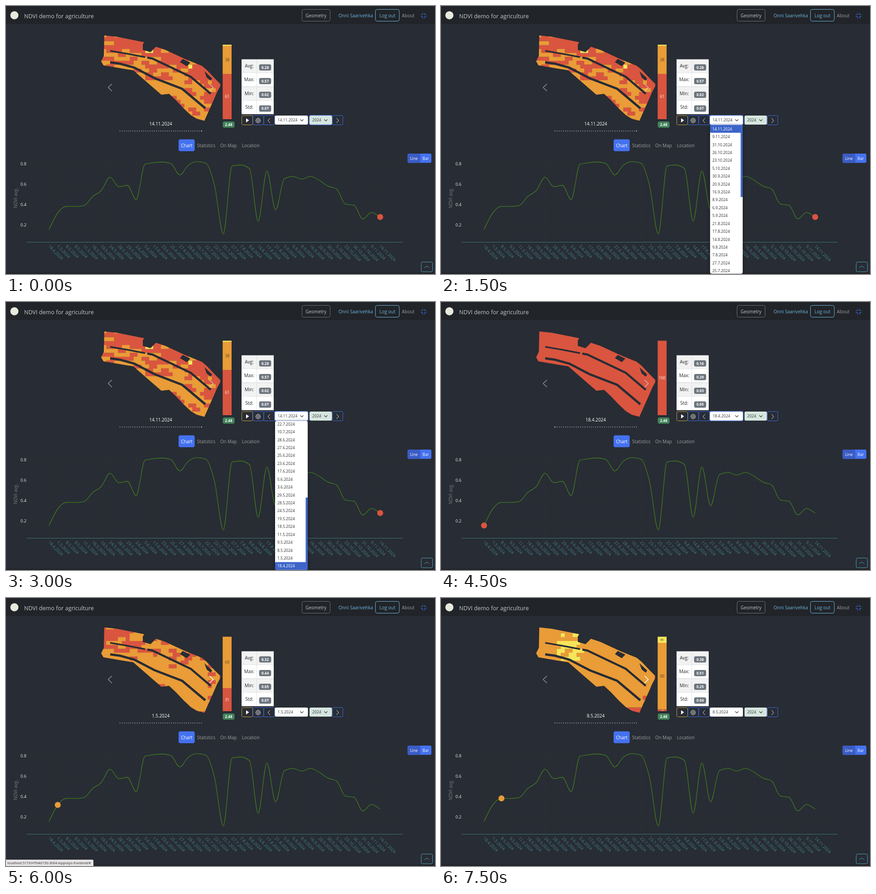
Write an HTML page that moves like this. It is 947 px wide and 592 px high and loops after 8 s.

```html
<!DOCTYPE html>
<html lang="en">
<head>
<meta charset="utf-8">
<title>NDVI demo for agriculture</title>
<style>
html, body { margin: 0; width: 100%; height: 100%; overflow: hidden; background: #282c34; }
svg { display: block; width: 100vw; height: 100vh; font-family: "Open Sans", "Noto Sans", sans-serif; }
</style>
</head>
<body>
<svg id="stage" viewBox="0 0 947 592">
  <defs>
    <clipPath id="field"><path d="M217 65L245 68L305 80L302 85V97L319 102L331 90L352 97L395 117L432 132L443 141L461 160L473 172V177L466 190L460 204L448 231L438 253.500L421 249L408 241L392 226L375 208L360 194L343 196L305 163L281 142L262 139L215 131L210 122L216 110Z"/></clipPath>
    <filter id="shade" x="-30%" y="-10%" width="160%" height="120%"><feGaussianBlur stdDeviation="4"/></filter>
  </defs>
  <g id="base"></g>
  <g id="live"></g>
</svg>
<script>
const BG = '#282c34', RED = '#d9553f', ORANGE = '#e99c37', YELLOW = '#f6e55a';
const BLUE = '#4472f0', DEEP = '#3d65c9', EDGE = '#3f68dc', GREY = '#9a9da2', DARK = '#212529', SKY = '#70b6e4';

const days = ('18.4 1.5 8.5 9.5 11.5 18.5 19.5 24.5 28.5 29.5 3.6 5.6 17.6 23.6 25.6 27.6 28.6 10.7 22.7 23.7 ' +
  '25.7 27.7 7.8 9.8 14.8 17.8 21.8 5.9 6.9 8.9 16.9 20.9 30.9 5.10 23.10 26.10 31.10 9.11 14.11')
  .split(' ').map(d => d + '.2024');
const ndvi = [.157, .32, .384, .383, .391, .48, .54, .671, .577, .59, .45, .797, .813, .82, .803, .693, .79, .824, .808,
  .585, .113, .78, .79, .755, .24, .732, .35, .655, .677, .652, .678, .64, .583, .555, .407, .395, .26, .324, .28];
const last = days.length - 1;
const px = i => 95 + 731 / last * i;
const py = v => 529 - 225 * v;

function text(x, y, str, size, fill, anchor = 'start', extra = '') {
  return `<text x="${x}" y="${y}" font-size="${size}" fill="${fill}" text-anchor="${anchor}" ${extra}>${str}</text>`;
}
const mid = (x, y, str, size, fill, extra) => text(x, y, str, size, fill, 'middle', extra);
const bold = (x, y, str) => mid(x, y, str, 8, '#fff', 'font-weight="700"');
function rect(x, y, w, h, fill, r = 0, stroke = 'none', extra = '') {
  return `<rect x="${x}" y="${y}" width="${w}" height="${h}" rx="${r}" fill="${fill}" stroke="${stroke}" ${extra}/>`;
}
function line(d, stroke, width = 1, extra = '') {
  return `<path d="${d}" fill="none" stroke="${stroke}" stroke-width="${width}" ${extra}/>`;
}
const chevron = (x, y, w, h) => `M${x - w / 2} ${y - h / 2}l${w} ${h / 2}l${-w} ${h / 2}`;

// Monotone cubic through equally spaced points
function curve() {
  const p = ndvi.map(py);
  const rise = p.slice(1).map((y, i) => y - p[i]);
  const slope = p.map((_, i) => {
    const a = rise[i - 1] ?? rise[0], b = rise[i] ?? rise[i - 1];
    return (Math.sign(a) + Math.sign(b)) * Math.min(Math.abs(a), Math.abs(b), Math.abs(a + b) / 4);
  });
  slope[0] = (3 * rise[0] - slope[1]) / 2;
  let d = `M${px(0)} ${p[0]}`;
  for (let i = 0; i < last; i++) {
    d += `C${px(i + 1 / 3)} ${p[i] + slope[i] / 3} ${px(i + 2 / 3)} ${p[i + 1] - slope[i + 1] / 3} ${px(i + 1)} ${p[i + 1]}`;
  }
  return d;
}

function header() {
  let corners = '';
  for (let turn = 0; turn < 360; turn += 90) {
    corners += line('M2.100 6.400V3.400A1.300 1.300 0 0 1 3.400 2.100H6.400', '#416fee', 1.1,
      `transform="translate(922 21.300) rotate(${turn})"`);
  }
  return rect(0, 0, 947, 40, '#212428') + rect(0, 589, 947, 3, '#212428') +
    '<circle cx="18.500" cy="20.500" r="9" fill="#e9e8dc"/>' +
    text(40, 26.7, 'NDVI demo for agriculture', 12.6, '#c6c8ca') +
    rect(653.5, 7.5, 62, 26, 'none', 4, '#6c757d') + mid(684.3, 24.5, 'Geometry', 9.9, '#c6c8ca') +
    text(734, 24.5, 'Onni Saarivehka', 10, SKY) +
    rect(815.5, 7.5, 52.7, 26, 'none', 4, SKY) + mid(842, 24.5, 'Log out', 10, SKY) +
    text(873.7, 24.5, 'About', 10, GREY) + corners;
}

function controls() {
  let out = '';
  ['Avg:', 'Max:', 'Min:', 'Std:'].forEach((name, i) => {
    const y = 117.7 + 30.3 * i;
    out += rect(520, y, 71, 30.3, i % 2 ? '#fff' : '#f2f2f2') + line(`M520 ${y + 30}H591`, '#dee2e6') +
      mid(537, y + 18.3, name, 10, DARK) + rect(558.7, y + 11, 26.6, 13.8, '#6c757d', 3.5);
  });
  out += line('M553.5 118V239', '#dee2e6');
  out += rect(478.5, 255, 26, 13.7, '#41845a', 3.5) + bold(491.5, 264.9, '2.48');
  out += rect(520.5, 242, 24, 20.5, 'none', 3, '#c5a43f') + '<path d="M530 248L536.500 252.600L530 257.300Z" fill="#fff"/>';
  out += [[545, 23.5], [569, 24], [720.5, 23]].map(([x, w]) => rect(x, 242, w, 20.5, 'none', 2, EDGE)).join('');
  let gear = '';
  for (let i = 0; i <= 48; i++) {
    const a = i / 48 * 2 * Math.PI, r = 4.7 + .7 * Math.tanh(3 * Math.cos(8 * a));
    gear += `${i ? 'L' : 'M'}${(556.5 + r * Math.cos(a)).toFixed(2)} ${(253 + r * Math.sin(a)).toFixed(2)}`;
  }
  out += line(gear, '#fff', .9) + '<circle cx="556.500" cy="253" r="2" fill="none" stroke="#fff" stroke-width=".9"/>';
  return out + line(chevron(580.5, 253, -5, 10.5) + chevron(732, 253, 5, 10.5), '#e4e6e9');
}

function chart() {
  let out = rect(381, 294.5, 35.5, 26.3, BLUE, 4) + mid(398.8, 311.7, 'Chart', 9.9, '#fff') +
    text(421.7, 311.7, 'Statistics', 9.9, GREY) + text(472.7, 311.7, 'On Map', 9.9, GREY) +
    text(520.8, 311.7, 'Location', 9.9, GREY);
  out += rect(886.5, 326, 52.5, 20.5, BLUE, 3) + rect(886.5, 326, 28, 20.5, '#3a5cc4', 3) +
    mid(900.5, 339.6, 'Line', 8.7, '#fff') + mid(926.6, 339.6, 'Bar', 8.7, '#fff');
  for (const v of [.2, .4, .6, .8]) {
    out += line(`M46 ${py(v)}H876`, '#2d3137', .8) + text(45, py(v) + 3.3, v.toFixed(1), 9.2, '#e8e9ea', 'end');
  }
  days.forEach((day, i) => {
    out += line(`M${px(i)} 328V522`, '#2d3137', .8) +
      text(0, 0, day, 9.2, '#41868a', 'start', `transform="translate(${px(i) - 2.3} 531.600) rotate(45)"`);
  });
  out += mid(0, 0, 'NDVI avg.', 10, '#767a80', 'transform="translate(25 424) rotate(-90)"');
  out += line('M45.500 521.800H876', '#3c7876') + line(curve(), '#3f7d20', 1.3);
  return out + rect(916.5, 565.5, 25, 21.5, 'none', 3, '#529eb5') + line('M923.500 578L929 574.500L934.500 578', '#529eb5');
}

// Vegetation class of a cell: 0 red, 1 orange, 2 yellow.
// "deep" counts cells down from the field's upper edge, "n" is seeded noise in 0..1.
const RULES = {
  autumn(c, r, deep, n) {
    if (Math.hypot(c - 12.5, r - 4.2) < .9 || Math.hypot(c - 23, r - 8) < .5) return 2;
    const chance = c < 2 && r > 3 ? .9 : deep < 3 ? .1 : deep < 9 ? .52 : .65;
    return n < chance ? 1 : 0;
  },
  spring: () => 0,
  may1(c, r, deep, n) {
    const chance = c > 27 ? .6 : deep > 4.5 ? .04 : c < 8 && deep < 2 ? .9 : .42;
    return n < chance ? 0 : 1;
  },
  may8(c, r, deep, n) {
    if (r > 20 || c > 30 || (c > 27 && r > 15 && n < .5)) return 0;
    return Math.hypot(c - 9, (r - 5) * .9) < 3.6 && n < .6 ? 2 : 1;
  }
};
const CELL = 8.63;
function noise(c, r) {
  const s = Math.sin(((c + r % 2) >> 1) * 12.9898 + r * 78.233) * 43758.5453;
  return s - Math.floor(s);
}
function mosaic(rule) {
  const paths = ['', '', ''];
  for (let r = 0; r < 23; r++) {
    for (let c = 0; c < 32; c++) {
      paths[rule(c, r, r - .5 - .0107 * c * c, noise(c, r))] += `M${c} ${r}h1.020v1.020h-1.020z`;
    }
  }
  return `<g transform="translate(203.900 60.400) scale(${CELL})">` +
    [RED, ORANGE, YELLOW].map((fill, i) => `<path d="${paths[i]}" fill="${fill}"/>`).join('') + '</g>';
}
function field(map) {
  return `<g clip-path="url(#field)">${mosaic(RULES[map])}` +
    line('M230 99L268 105.500L307 113', BG, 3.4) +
    line('M312 114L323 116L408 156.500L452 194', BG, 4.6) +
    line('M230 124.500L252 127.500L283 136L328 159.500L389 183L440 226', BG, 5) +
    `<path d="M384 124L390 117L407 125L399 133ZM438 144L455 160L452 165L443 158Z" fill="${BG}"/></g>`;
}

// Bar parts from the top: [bottom edge, colour, label, turned]
function stack(parts) {
  let top = 85.5;
  return parts.map(([end, fill, label, turned]) => {
    const y = (top + end) / 2, ink = fill === RED ? '#fff' : '#54452a';
    const out = rect(478.3, top, 19.7, end - top, fill) +
      (label ? mid(0, 3, label, turned ? Math.min(8.4, end - top + 2) : 8.4, ink,
        `transform="translate(488.200 ${y}) rotate(${turned ? -90 : 0})"`) : '');
    top = end;
    return out;
  }).join('');
}

function menu(bottom) {
  const newest = days.slice().reverse();
  const items = bottom ? newest.slice(-19) : newest.slice(0, 19);
  const pick = bottom ? 18 : 0, y0 = bottom ? 269.6 : 271.5;
  let out = rect(594, 264, 72, 328, '#000', 4, 'none', 'opacity=".4" filter="url(#shade)"') +
    rect(594, 262.5, 72, 329, '#fff', 4) +
    rect(594, y0 + 17.42 * pick - 8.6, 72, 17, DEEP, 2) +
    rect(661.5, bottom ? 432 : 263, 4.5, 159, DEEP);
  items.forEach((day, i) => { out += text(599, y0 + 17.42 * i + 3.2, day, 8.5, i === pick ? '#fff' : '#2d3136'); });
  return out;
}

function select(x, w, fill, label, focus) {
  return (focus ? rect(x - .5, 241.5, w + 1, 21, BLUE, 3.5, '#426bdc', 'stroke-width="1.200"') : '') +
    rect(x, 242, w, 20, fill, 3, focus ? '#86a9ee' : 'none') + text(x + 6, 255.2, label, 8.6, '#33383d') +
    line(`M${x + w - 17} 250.500l3.500 3.500l3.500 -3.500`, '#33383d', 1.2);
}

const autumn = { day: last, map: 'autumn', stats: ['0.28', '0.57', '0.02', '0.07'], dot: RED,
  bar: [[88, YELLOW], [150, ORANGE, '38'], [250, RED, '61']] };
const scenes = [
  { ...autumn, focus: 'year' },
  { ...autumn, focus: 'date', menu: 'top' },
  { ...autumn, focus: 'date', menu: 'bottom' },
  { day: 0, map: 'spring', stats: ['0.16', '0.29', '0.03', '0.05'], dot: RED, focus: 'date',
    bar: [[250, RED, '100']] },
  { day: 1, map: 'may1', stats: ['0.32', '0.44', '0.05', '0.07'], dot: ORANGE, hover: true, link: true,
    bar: [[199, ORANGE, '69'], [250, RED, '31']] },
  { day: 2, map: 'may8', stats: ['0.38', '0.51', '0.25', '0.04'], dot: ORANGE, hover: true,
    bar: [[99, YELLOW, '8', true], [246.5, ORANGE, '90'], [250, RED, '2', true]] }
];

function draw(s) {
  let out = field(s.map) + stack(s.bar);
  out += line(chevron(229.7, 180, -8.5, 16), '#fff', 1.2, 'opacity=".55"') +
    line(chevron(453.3, 180, 8.5, 16), '#fff', 1.4, `opacity="${s.hover ? 1 : .55}"`);
  out += mid(341.5, 264.4, days[s.day], 9.9, '#fff');
  days.forEach((_, i) => {
    const lit = i === s.day && !s.hover;
    out += rect(250.8 + 4.737 * i, 275, 1.5, 2.2, '#fff', 0, 'none', `opacity="${lit ? 1 : .5}"`);
  });
  s.stats.forEach((v, i) => { out += bold(572, 138.5 + 30.3 * i, v); });
  out += select(593.5, 73, '#fff', days[s.day], s.focus === 'date') +
    select(670, 49.5, '#d6e6df', '2024', s.focus === 'year');
  out += `<circle cx="${px(s.day)}" cy="${py(ndvi[s.day])}" r="6.600" fill="${s.dot}"/>`;
  if (s.menu) out += menu(s.menu === 'bottom');
  if (s.link) {
    out += '<path d="M0 578H190.500Q193 578 193 581V592H0Z" fill="#e6e3e4"/>' +
      text(3, 587.6, 'localhost:5173/HTKA0150-3004-lopputyo-frontend/#', 7.55, '#2a2a2a');
  }
  return out;
}

const LOOP = 8000, HOLD = 1500;
const live = document.getElementById('live');
document.getElementById('base').innerHTML = header() + controls() + chart();
const start = performance.now();
let shown = null;
function tick(now) {
  const t = Math.max(0, now - start) % LOOP;
  const scene = scenes[Math.floor(t / HOLD)];
  if (scene !== shown) {
    live.innerHTML = draw(scene);
    shown = scene;
  }
  requestAnimationFrame(tick);
}
tick(start);
</script>
</body>
</html>
```
